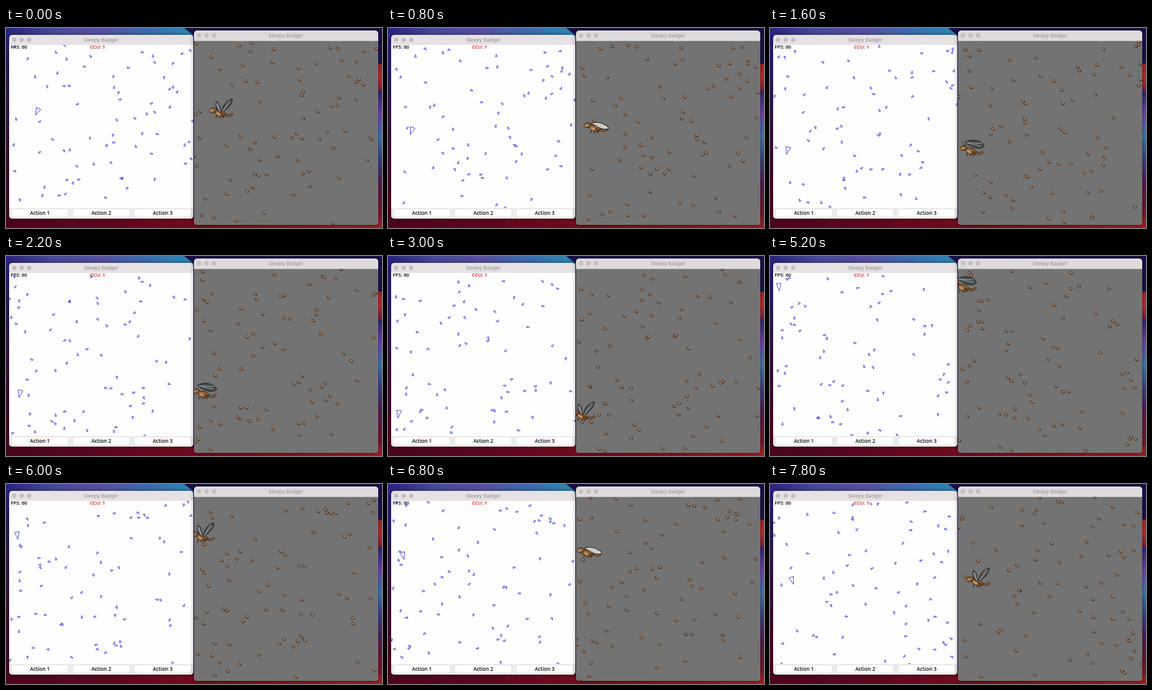
An HTML page with a canvas that plays this animation: 600x320 px, repeating every 8000 ms.

```html
<!DOCTYPE html>
<html lang="en">
<head>
<meta charset="utf-8">
<title>Sleepy Badger</title>
<style>
html, body { margin: 0; width: 100%; height: 100%; overflow: hidden; background: #1a0c2c; }
canvas { display: block; width: 600px; height: 320px; }
</style>
</head>
<body>
<canvas id="stage"></canvas>
<script>
const W = 600, H = 320, LOOP = 8000, STEP = 200;
const SIZE = 294, COUNT = 76, SPEED = 41.3, LAG = 0.12;
const TITLE = 'Sleepy Badger';
const LABEL = '600 7.8px "Open Sans", sans-serif';
const canvas = document.getElementById('stage');
const scale = window.devicePixelRatio || 1;
canvas.width = W * scale;
canvas.height = H * scale;
const c = canvas.getContext('2d');
c.scale(scale, scale);

let seed = 20;
function random() {
  seed = (seed * 16807) % 2147483647;
  return seed / 2147483647;
}

const swarm = Array.from({ length: COUNT }, () => ({
  x: random() * SIZE,
  y: random() * SIZE,
  dir: random() * Math.PI * 2,
  turn: (0.03 + random() * 0.12) * (random() < 0.5 ? 1 : -1)
}));
const leader = { x: 43, y: 110.6, dir: 1.973, turn: -0.094 };

const wrap = v => ((v % SIZE) + SIZE) % SIZE;

// Every flyer follows a wide arc at constant speed on a wrapping field
function pose(f, t) {
  const dir = f.dir + f.turn * t, r = SPEED / f.turn;
  return {
    x: wrap(f.x + r * (Math.sin(dir) - Math.sin(f.dir))),
    y: wrap(f.y - r * (Math.cos(dir) - Math.cos(f.dir))),
    dir
  };
}

function rect(x, y, w, h, fill) {
  c.fillStyle = fill;
  c.fillRect(x, y, w, h);
}

function box(x, y, w, h, r, fill) {
  c.beginPath();
  c.roundRect(x, y, w, h, r);
  c.fillStyle = fill;
  c.fill();
}

function oval(x, y, rx, ry, tilt, fill, stroke) {
  c.beginPath();
  c.ellipse(x, y, rx, ry, tilt, 0, Math.PI * 2);
  c.fillStyle = fill;
  c.fill();
  if (stroke) {
    c.strokeStyle = stroke;
    c.stroke();
  }
}

function line(x0, y0, x1, y1, color, width = 1) {
  c.beginPath();
  c.moveTo(x0, y0);
  c.lineTo(x1, y1);
  c.lineWidth = width;
  c.strokeStyle = color;
  c.stroke();
}

function text(str, x, y, font, fill, align = 'center') {
  c.font = font;
  c.fillStyle = fill;
  c.textAlign = align;
  c.fillText(str, x, y);
}

// Gradient with evenly spaced colours
function blend(x0, y0, x1, y1, ...colors) {
  const g = c.createLinearGradient(x0, y0, x1, y1);
  colors.forEach((color, i) => g.addColorStop(i / (colors.length - 1), color));
  return g;
}

function desktop() {
  rect(0, 0, W, H, '#1a1048');
  c.beginPath();
  c.moveTo(0, 0);
  c.lineTo(284, 0);
  c.lineTo(302, 14);
  c.lineTo(0, 14);
  c.fillStyle = blend(0, 0, 300, 0, '#2a2280', '#454a98', '#57509e', '#3a6cb0', '#2a8ab4');
  c.fill();
  rect(0, 14, 10, H, blend(0, 14, 0, H, '#2a2274', '#2a1a58', '#3a1040', '#46082a', '#4a0420'));
  rect(590, 57, 10, 44, blend(0, 57, 0, 101, '#a8202c', '#c02a30', '#7c1c3c'));
  rect(590, 101, 10, H, blend(0, 101, 0, H,
    '#2c2470', '#7040b8', '#3a78b4', '#3c4088', '#501c50', '#701430', '#861a28'));
  rect(0, 304, W, 16, blend(0, 0, W, 0, '#48041e', '#5c0620', '#700a1e', '#86141f', '#961f26'));
}

function frame(x, y, h, bar) {
  c.save();
  c.shadowColor = 'rgba(0,0,0,.5)';
  c.shadowBlur = 6 * scale;
  box(x, y, SIZE, h, 5, bar);
  c.restore();
  for (let i = 0; i < 3; i++) oval(x + 8 + i * 12, y + 7.7, 3.5, 3.5, 0, '#c3bec0');
  text(TITLE, x + 147, y + 10.6, '600 7.9px Inter, sans-serif', '#a5a1a3');
}

function arrow(p, length, width) {
  c.save();
  c.translate(p.x, p.y);
  c.rotate(p.dir);
  c.beginPath();
  c.moveTo(length * 0.6, 0);
  c.lineTo(-length * 0.4, width / 2);
  c.lineTo(-length * 0.4, -width / 2);
  c.closePath();
  c.strokeStyle = '#342ce0';
  c.stroke();
  c.restore();
}

function radarWindow(t) {
  frame(5, 11, 294, '#e6e1e3');
  c.save();
  c.beginPath();
  c.rect(5, 27, SIZE, 261);
  c.clip();
  rect(5, 27, SIZE, 261, '#fefefe');
  text('FPS: 60', 7.5, 33.2, LABEL, '#000', 'left');
  text('CCU: 1', 134, 33.2, LABEL, '#d00c0c', 'left');
  c.translate(5, 27);
  c.lineWidth = 0.8;
  for (const f of swarm) arrow(pose(f, t - LAG), 4.2, 2.8);
  arrow(pose(leader, t - LAG), 12, 7.5);
  c.restore();

  box(5, 288, SIZE, 17, [0, 0, 5, 5], '#ececec');
  for (let i = 0; i < 3; i++) {
    const x = 9 + i * 98;
    box(x - 0.4, 289.8, 90.8, 12.8, 2.6, '#d3d3d3');
    box(x, 290, 90, 12, 2.4, '#fff');
    text('Action ' + (i + 1), x + 45, 298.6, '600 8.1px "Open Sans", sans-serif', '#000');
  }
}

function drone(p) {
  oval(p.x, p.y, 3, 2.5, 0.3, '#3b2e25');
  oval(p.x - 0.6, p.y + 0.3, 1.9, 1.4, 0.5, '#94694a');
  oval(p.x + 0.7, p.y - 1, 1.4, 0.8, 0.2, '#c6ab94');
}

const EDGE = '#2a1c14', SKIN = '#96663c', PALE = '#c79460', DARK = '#5c3a22';

function body() {
  c.beginPath();
  c.moveTo(3, 4);
  c.quadraticCurveTo(12, 13, 19, 5);
  c.lineWidth = 3.6;
  c.strokeStyle = EDGE;
  c.stroke();
  c.lineWidth = 2;
  c.strokeStyle = SKIN;
  c.stroke();
  for (const x of [-6, 0, 5]) line(x, 6, x - 2, 13, DARK, 2);
  c.lineWidth = 1;
  oval(-1, 5, 9, 4.5, 0.3, SKIN, EDGE);
  oval(-4, 6, 4, 2, 0.4, PALE);
  oval(3, 7, 4, 1.6, 0.3, DARK);
  oval(-13, 0, 5.5, 3.6, -0.3, SKIN, EDGE);
  oval(-15, 0.5, 3, 1.3, -0.3, PALE);
  oval(-12, -2, 1.2, 1, 0, '#587d3c');
}

// A leaf-shaped wing from its root to its tip, with pale ribs
function wing(x0, y0, x1, y1, width, fill, rib) {
  const length = Math.hypot(x1 - x0, y1 - y0);
  c.save();
  c.translate(x0, y0);
  c.rotate(Math.atan2(y1 - y0, x1 - x0));
  c.beginPath();
  c.moveTo(0, 0);
  c.bezierCurveTo(length * 0.3, -width, length * 0.8, -width, length, 0);
  c.bezierCurveTo(length * 0.8, width, length * 0.4, width * 0.6, 0, 0);
  c.fillStyle = fill;
  c.fill();
  c.lineWidth = 1;
  c.strokeStyle = '#242322';
  c.stroke();
  for (const side of [-0.4, 0.1]) line(2, 0, length * 0.85, width * side, rib, 0.8);
  c.restore();
}

function dragon(p, flap) {
  c.save();
  c.translate(p.x, p.y + [1, -6, -1][flap]);
  body();
  if (flap === 0) {
    wing(-1, 4, -7, -14, 4.5, '#5c5c5e', '#b4b4b4');
    wing(1, 4, 18, -18, 6, '#4a4a4c', '#b4b4b4');
  } else if (flap === 1) {
    wing(-7, -3, 21, 5, 6, '#e4e1da', '#a9a69f');
  } else {
    wing(-11, -9, 20, -3, 9, '#454a4a', '#b4bab9');
  }
  c.restore();
}

function gameWindow(t, flap) {
  frame(300, 4, 311, '#dfdadc');
  c.save();
  c.beginPath();
  c.roundRect(300, 20.7, SIZE, 294.3, [0, 0, 5, 5]);
  c.clip();
  rect(300, 20, SIZE, 295, '#737373');
  c.translate(300, 20);
  for (const f of swarm) drone(pose(f, t));
  dragon(pose(leader, t), flap);
  c.restore();
}

function draw(now) {
  const step = Math.floor((now % LOOP) / STEP);
  const t = step * STEP / 1000;
  desktop();
  radarWindow(t);
  gameWindow(t, step % 3);
  requestAnimationFrame(draw);
}
draw(0);
</script>
</body>
</html>
```
